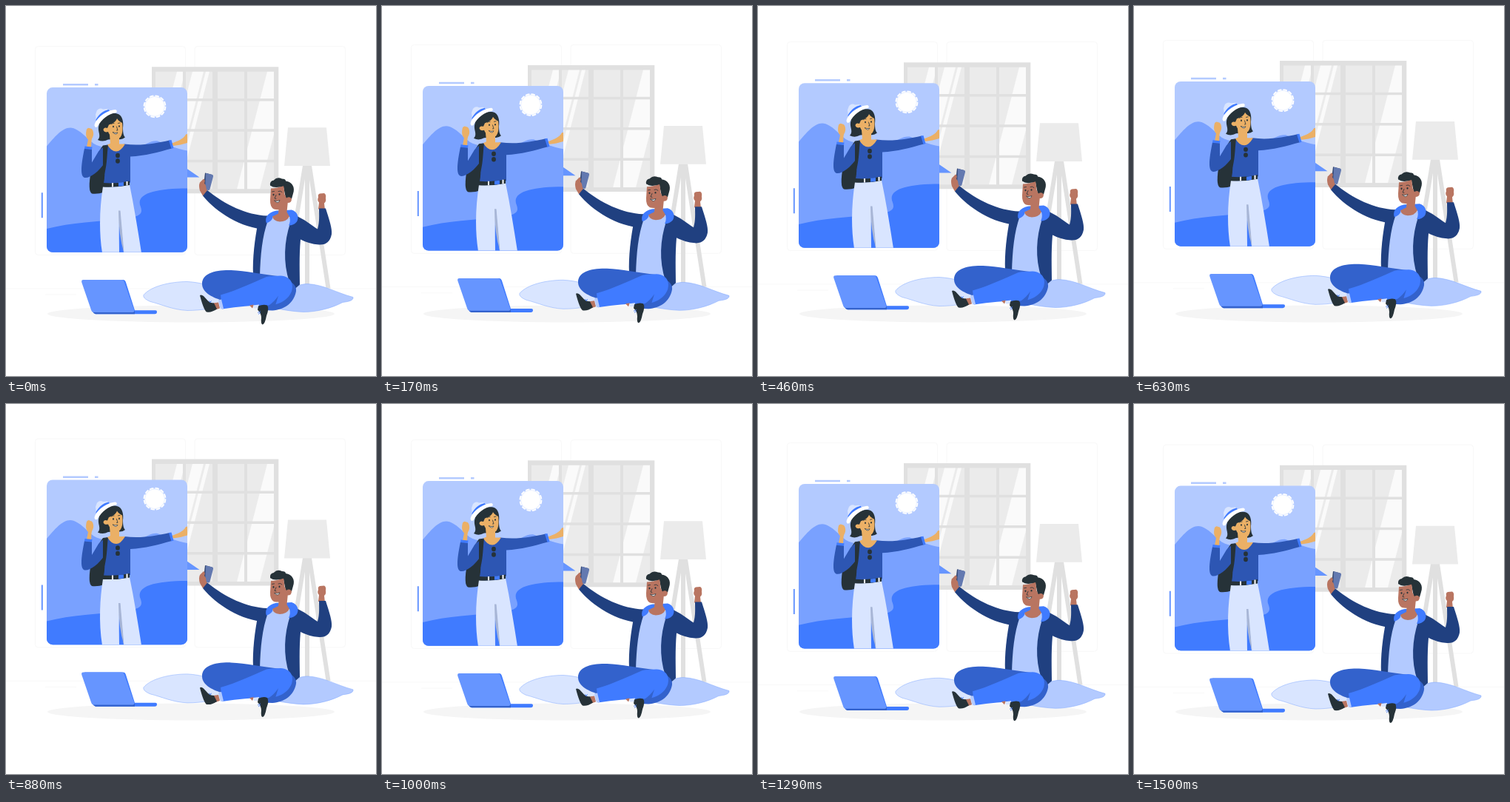
An HTML page that plays this animation: 500x500 px, repeating every 1.54 s.

```html
<!DOCTYPE html>
<html lang="en">
<head>
<meta charset="utf-8">
<title>Selfie call</title>
<style>
  html, body { margin: 0; height: 100%; overflow: hidden; background: #fff; }
  svg { display: block; width: 100vw; height: 100vh; }
  .blue { fill: #407bff; }
  .mid { fill: #6695ff; }
  .soft { fill: #b3caff; }
  .pale { fill: #d9e5ff; }
  .deep { fill: #3362cc; }
  .shirt { fill: #2d56b3; }
  .navy { fill: #204080; }
  .dark { fill: #263238; }
  .white { fill: #fff; }
  .tan { fill: #ebb066; }
  .brown { fill: #b97561; }
  .frame { fill: #e0e0e0; }
  .pane { fill: #ebebeb; }
  .seam { stroke: #7fa6ff; stroke-width: .5; }
  .line { fill: none; stroke: #263238; stroke-width: .8; stroke-linecap: round; }
</style>
</head>
<body>
<svg viewBox="0 0 500 500">
  <defs>
    <clipPath id="card"><rect x="55" y="110.600" width="190" height="222.700" rx="8"/></clipPath>
    <clipPath id="glass"><path d="M202 89h37v159h-37zM243 89h36v159h-36zM286 89h36v159h-36zM326 89h36v159h-36z"/></clipPath>
  </defs>
  <ellipse cx="250" cy="416" rx="194" ry="11.400" fill="#f5f5f5"/>
  <g id="scene">
    <!-- room -->
    <g fill="none" stroke="#f8f8f8">
      <rect x="39.500" y="55" width="203" height="282" rx="4"/>
      <rect x="255" y="55" width="203.500" height="282" rx="4"/>
      <path d="M0 382.400H500M53 390.500H95"/>
    </g>
    <path class="frame" d="M197 82.700h171.300v171H197z"/>
    <g clip-path="url(#glass)">
      <path class="pane" d="M197 83h171v171H197z"/>
      <path fill="#fafafa" d="M231 89h11l-41 159h-11zM252 89h15l-41 159h-15zM270 89h5l-41 159h-5zM353 89h31l-41 159h-31z"/>
      <path class="frame" d="M200 125.500h165v3.500H200zM200 166.700h165v3.500H200zM200 208.200h165v3.500H200z"/>
    </g>
    <path class="frame" d="M401 216h6L380 382h-6zM404 216h6v162h-6zM407 216h6l25.500 166h-6z"/>
    <path class="pane" d="M381 164.700h52l5 51.800h-62z"/>

    <!-- cushions -->
    <path class="pale seam" d="M186 391C196 379 222 373 245 373C265 374 280 380 300 385V405C285 408 265 412 245 412C225 411 211 404 195 400C188 397 185 394 186 391Z"/>
    <path class="soft seam" d="M345 405C370 393 385 377 407 376C430 377 446 388 469 394C470 398 464 400 455 401C440 409 420 414 402 414C380 413 365 409 345 405Z"/>

    <!-- laptop -->
    <path class="blue" d="M106 370.600H158Q161 370.600 162 374L174 411.800H202Q204 411.800 204 413.500Q204 416.800 201 416.800H121Q118 416 117 413Z"/>
    <path class="deep" d="M117 413H174V416.800H121Q118 416 117 413Z"/>
    <path class="mid" d="M104.500 370.600H156Q159 370.600 160 374L173 411Q174 414.500 171 414.500H119Q116 414.500 115 411L102.300 374Q101.500 370.600 104.500 370.600Z"/>

    <!-- picture card -->
    <path class="soft" d="M77 105.500h34v2.500H77zM120 105.500h4.500v2.500H120z"/>
    <path class="mid" d="M47.800 252.700h2v34h-2zM244 220L261.500 232H244z"/>
    <g clip-path="url(#card)">
      <path class="soft" d="M55 110h190v224H55z"/>
      <circle cx="201" cy="136.300" r="14" fill="#e6eeff"/>
      <circle cx="201" cy="136.300" r="14.500" fill="none" stroke="#fff" stroke-width="1.800" stroke-dasharray="5.500 2.092"/>
      <circle class="white" cx="201" cy="136.300" r="12.800"/>
      <path fill="#79a1ff" d="M55 190C68 175 81 158 96 168C110 176 114 187 127 190C147 195 165 200 178 194C190 186 197 182 205 183C219 188 231 194 245 196V334H55Z"/>
      <path class="blue" d="M55 301.500C88 293 125 292 160 288C182 285 185 281 182 272C174 254 202 247 245 247V334H55Z"/>

      <!-- traveller -->
      <path class="dark" d="M115 222C120 206 126 196 131 189L138 188L133 252Q124 255 116 254Q110 251 115 222Z"/>
      <path class="tan" d="M109 191L111 181C107 177 108 171 109 167Q111 164 114 166Q117 166 118 171C119 177 116 178 115.500 183L115 192Z"/>
      <path class="shirt" d="M106 193L116 194L116 212L125 197Q130 191 137 188.500L133 213C124 226 111 235 105 232C100 228 102 213 106 193Z"/>
      <path class="blue" d="M106.500 190L116.500 191L116 194.500L106 193.500Z"/>
      <path class="tan" d="M224 186C232 183 239 181 243 174L247 173V185C240 187 234 189 226 189.500Z"/>
      <path class="shirt" d="M160 187C182 190 202 186 221 182L224 193C206 198 188 203 168 204L168 239Q150 243 132 240C135 226 132 208 131 193L137 188C146 190 152 190 160 187Z"/>
      <path class="blue" d="M220 182L223.500 181.500L226.500 192.500L223.500 193.500Z"/>
      <path class="dark" d="M131 191L138 188C136 205 137 216 131 235Z"/>
      <path class="dark" d="M125 164C127 150 140 144 150 146C158 148 159 158 158 165C158 173 159 176 161 178Q156 182 150 180L138 181Q131 185 124 181.500C129 176 124 171 125 164Z"/>
      <path class="tan" d="M140 174L153 177L153 187L161 187Q155 197 149 197Q142 197 137 188L141 186Z"/>
      <path class="tan" d="M139 161C145 159.500 149 156 150 152.500C152 156 155 157 157 158.500C158.500 169 157 180 150 180.300C144 180.500 140 175 138 170.500Q133 172 131.500 168Q132 164 137 165.500Z"/>
      <path class="pale" d="M122 156L121 147L123 141.500Q127 137.500 131 140L137 139.500L141 144Z"/>
      <path class="blue" d="M121.500 154C126 146 132 142 138.500 140.500L141 143.500C133 146 127 150 122 158Z"/>
      <path class="white" d="M119.500 162C121 152 136 141 148 140.500Q151 142 149 144.500C138 146 130 153 123.500 163.500Q120.500 166 119.500 162Z"/>
      <g class="dark">
        <ellipse cx="145" cy="163.500" rx=".9" ry="1.300"/><ellipse cx="153" cy="163" rx=".9" ry="1.300"/>
        <ellipse cx="151" cy="202.500" rx="2.900" ry="3.200"/><ellipse cx="151" cy="210" rx="2.900" ry="3.200"/>
      </g>
      <path class="line" d="M142.500 160Q144 158.500 146 159M151.500 159L154 158.500M149.500 163.500L151 168.500H149.500"/>
      <path class="white" stroke="#263238" stroke-width=".7" d="M144 171Q148 173 151 171.500Q149 176 144 171Z"/>
      <path class="pale" d="M131 244.500Q149 246 167 242C173 271 178 302 183 334H159C157 310 155 293 154 277C152 297 153 318 153 334H130C125 302 127 271 131 244.500Z"/>
      <path fill="#a8b6d6" d="M152 277H154.500L159.500 334Q152 310 152 277Z"/>
      <path class="dark" d="M131 239.500Q150 241 167 237V242.500Q150 246 130.500 245Z"/>
      <path class="white" d="M143 239.500h2v5.500h-2zM162.500 237.500h2v5.500h-2z"/>
      <path class="blue" d="M152 239.300l7-.8v5l-7 .8z"/>
    </g>

    <!-- caller: arms, torso and head -->
    <path class="brown" d="M266 257L262 250Q260 243 262 239L267 234L271 238L272 249L271 254Z"/>
    <path fill="#33466f" d="M269 226L278.500 228.500L273.500 249L266.500 247Z"/>
    <path fill="#6379b0" d="M270 226.300L279 228.500Q280.500 229 280 231L275.500 248Q275 250 273 249.500L269 248Z"/>
    <path class="brown" d="M262 249Q261 240 267 235Q270 235 268 240L270 243L271 249L268 254Z"/>
    <path class="navy" d="M272 249.500C296 269 325 283 353 284L352 303C317 300 285 280 266 257Z"/>
    <path class="brown" d="M422 275L423 266Q420 263 422 259Q421 255 424 254L430 253.500Q433 255 432 260Q433 265 430 267L431 276Z"/>
    <path class="navy" d="M392 284C402 288 412 296 421 302C424 292 423 283 423 274L432 274C437 290 441 301 440 309Q437 324 423 323Q409 322 396 315Z"/>
    <path class="soft" d="M350 287L394 286L390 376L338 367Z"/>
    <path class="navy" d="M353 284L341 291C336 316 333 341 334 364L343 366C344 336 346 313 354 290Z"/>
    <path class="navy" d="M384 294Q390 292 394 284L398 316C396 340 397 360 397 377L390 383L383 374C374 346 376 319 384 294Z"/>
    <path class="blue" d="M352 294C348 283 360 276 370 277L386 276C395 279 396 287 393 292Q389 297 382 297Q385 291 383 285L361 285Q360 291 352 294Z"/>
    <path class="brown" d="M369 268L381 264L379.500 279L383 285Q379 292 370 292Q361 291 360 285L368 281Z"/>
    <path class="dark" d="M357 243Q356 237 362 236Q366 231 373 234Q378 234 378 237C387 238 391 246 388 254L386 261L379 265L375 245Z"/>
    <path class="brown" d="M358 247Q367 247 375 243Q376 249 376.500 255L379 260Q383 257 386 261Q386 267 380 266.500C378 275 370 277 362 275Q356.500 272 357 262Z"/>
    <path class="dark" d="M357 243Q363 248 376 243.500L378 237L363 235Z"/>
    <g class="dark"><ellipse cx="361.500" cy="255.500" rx="1" ry="1.300"/><ellipse cx="369.500" cy="255" rx="1" ry="1.300"/></g>
    <path class="line" d="M359.500 251.500L362.500 251M368 251Q371 249.500 373 252M365 256L363 260.500L365 261"/>
    <path class="white" stroke="#263238" stroke-width=".7" d="M362.500 263.500Q367 265 370 263Q368 269 362.500 263.500Z"/>

    <!-- caller: legs -->
    <path class="deep" d="M380 371Q393 376 392 386C389 402 376 411 360 412Q347 412 338 406L365 392Z"/>
    <path class="deep" d="M265 376C265 362 282 357 304 357.500C324 358.500 345 363 371 366L345 394L291 398C278 394 265 387 265 376Z"/>
    <path class="blue" d="M290 391C312 385 334 374 352 366.500Q360 365 371 365C386 366 389 377 386 386C380 401 364 406 348 405Q326 405 292 410Z"/>
    <path class="deep" d="M368 392L364 405Q359 407 354 406Q363 400 368 392Z"/>
    <path class="soft" d="M287 398L291 397L294 409.500L290 410Z"/>
    <path class="brown" d="M280 402L287 401L289 409L283 411ZM329 405L335 404L333 409Z"/>
    <path class="pale" d="M334 405L342 404L341 409L335 409Z"/>
    <path class="dark" d="M262 391.500Q264 390 267 392.500L273 399Q276 402 281 402L285 410Q278 415 271 414Q267 411 262 391.500ZM341 406Q348 403 353 405Q356 409 352 419Q350 430 347 431Q344 431 345 422Q345 416 340 411Z"/>
    <path fill="none" stroke="#407bff" stroke-width=".8" d="M274 399L277 401M275 401L278 399M340 415L344 413M341 417L344 415"/>
  </g>
</svg>
<script>
  const LOOP = 1540, FPS = 24, LIFT = 10, LEAD = 40;
  const scene = document.getElementById('scene');

  // Linear float up and back, sampled in steps of 1/24 s.
  function draw(now) {
    const step = Math.floor(((now % LOOP) + 5) * FPS / 1000);
    const phase = ((step * 1000 / FPS + LEAD) % LOOP) / LOOP;
    const rise = 1 - Math.abs(1 - 2 * phase);
    scene.setAttribute('transform', `translate(0 ${-LIFT * rise})`);
    requestAnimationFrame(draw);
  }
  draw(0);
</script>
</body>
</html>
```
